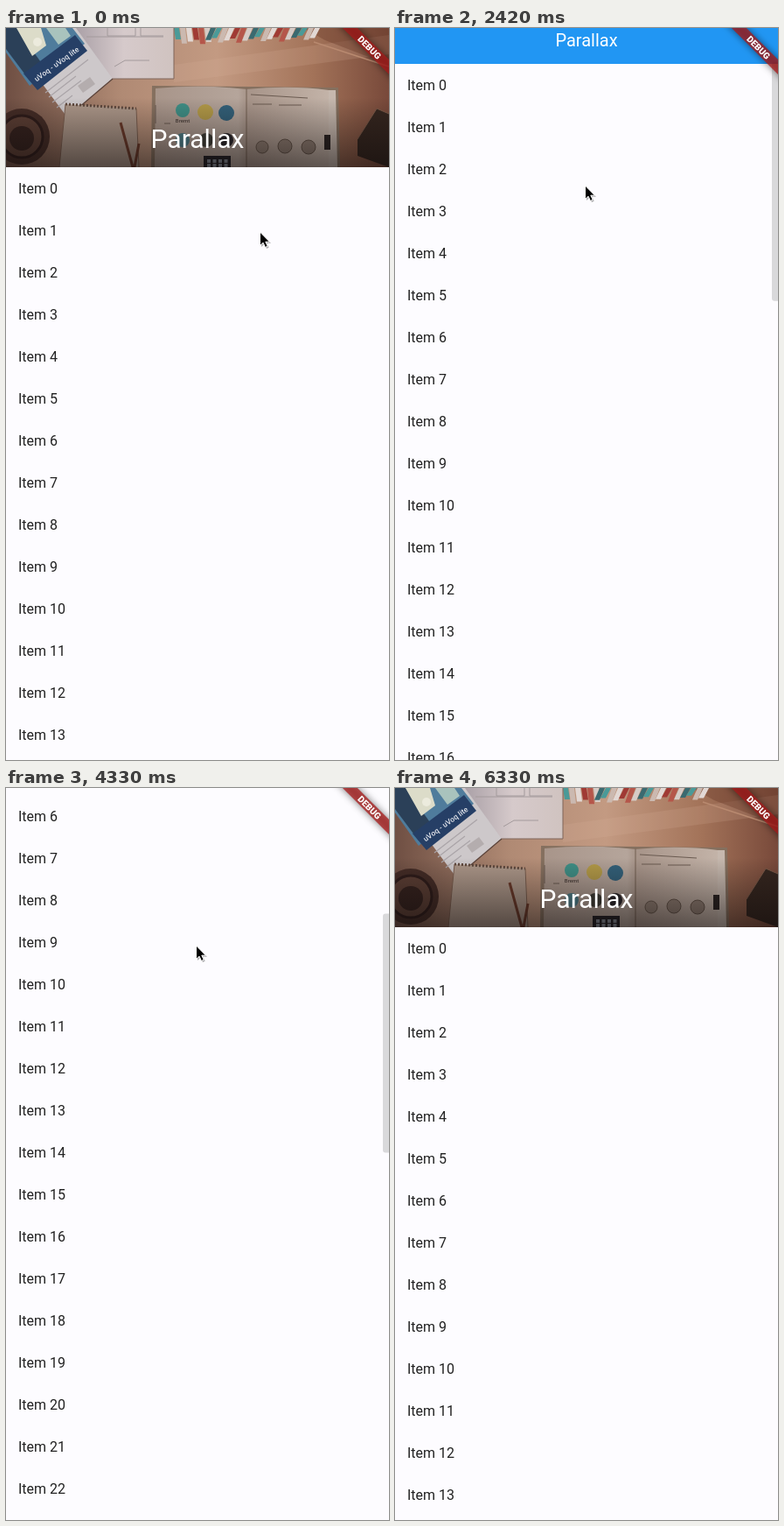
These frames come from a looping animation (438x836 px, 6.66 s). An HTML page:

```html
<!DOCTYPE html>
<html lang="en">
<head>
<meta charset="utf-8">
<title>Parallax list</title>
<style>
html, body { margin: 0; width: 100%; height: 100%; overflow: hidden; background: #fdfcff; }
svg { display: block; width: 100vw; height: 100vh; font-family: Roboto, sans-serif; }
</style>
</head>
<body>
<svg id="stage" viewBox="0 0 438 836" xmlns="http://www.w3.org/2000/svg">
  <defs>
    <linearGradient id="wood">
      <stop offset="0" stop-color="#6f4f43"/>
      <stop offset=".3" stop-color="#b08a74"/>
      <stop offset=".55" stop-color="#c39a82"/>
      <stop offset=".8" stop-color="#a37359"/>
      <stop offset="1" stop-color="#78493a"/>
    </linearGradient>
    <linearGradient id="scrim" x2="0" y2="1">
      <stop offset=".5" stop-color="#0c0808" stop-opacity="0"/>
      <stop offset="1" stop-color="#0c0808" stop-opacity=".55"/>
    </linearGradient>
    <linearGradient id="sheet">
      <stop offset="0" stop-color="#a99fa6"/>
      <stop offset=".5" stop-color="#d6cacb"/>
      <stop offset="1" stop-color="#d0c3c0"/>
    </linearGradient>
    <linearGradient id="page">
      <stop offset="0" stop-color="#a8958a"/>
      <stop offset=".48" stop-color="#b5a59b"/>
      <stop offset=".53" stop-color="#a79489"/>
      <stop offset="1" stop-color="#c3b3a8"/>
    </linearGradient>
    <filter id="soft" x="-30%" y="-120%" width="160%" height="340%"><feGaussianBlur stdDeviation="4"/></filter>
    <clipPath id="headClip"><rect id="headBox" width="438" height="159"/></clipPath>
  </defs>
  <rect width="438" height="836" fill="#fdfcff"/>
  <g id="list" font-size="16" fill="#212121"></g>

  <g clip-path="url(#headClip)">
    <rect width="438" height="159" fill="#2196f3"/>
    <g id="photo">
      <rect width="438" height="159" fill="url(#wood)"/>
      <path d="M192 42L438 8V30L192 62Z" fill="#d8b29c" opacity=".18"/>
      <path d="M340 0H438V42L365 14Z" fill="#6a3a2a" opacity=".4"/>
      <path d="M352 16L438 44" stroke="#b98a70" stroke-width="1.5"/>
      <g id="books"></g>

      <path d="M78 0H192V58H118Z" fill="url(#sheet)"/>
      <path d="M192 0V58H118" fill="none" stroke="#7f6558" stroke-width="1"/>
      <path d="M92 10H180M116 0V9H148V0M154 0V9H180M124 44L136 37H164" fill="none" stroke="#a39a9c"/>

      <path d="M0 0H80L122 58L70 102L0 8Z" fill="#cdc8ca"/>
      <path d="M0 0H76L90 18L27 66L0 28Z" fill="#4f7c9c"/>
      <path d="M0 0H12L42 42L27 60L0 24Z" fill="#2b4058"/>
      <path d="M12 0H40L46 20L30 32Z" fill="#dcdcc9"/>
      <path d="M46 0H68L74 9L60 19Z" fill="#a9c3bd"/>
      <circle cx="36" cy="16" r="5" fill="#ecebdd"/>
      <path d="M20 52L79 8L93 26L36 71Z" fill="#263f66"/>
      <text transform="translate(35 61.5) rotate(-36)" font-size="8.6" font-weight="500" fill="#e4e6ec">uVoq - uVoq lite</text>
      <path d="M45 74L94 36M49 79L80 55M53 85L86 60M58 91L76 77" stroke="#aaa4a8" stroke-width="1.2"/>
      <path d="M82 66L96 56L102 64L88 74Z" fill="#b4adae"/>
      <path d="M70 102L122 58" stroke="#5a4239" stroke-width="1.2"/>

      <circle cx="18" cy="124" r="32" fill="#442c26"/>
      <circle cx="18" cy="124" r="24" fill="#5b3e34" stroke="#2e1c1a" stroke-width="3"/>
      <circle cx="18" cy="126" r="14" fill="#35221e"/>
      <path d="M68 87L149 92L152 159H61Z" fill="#ac9789"/>
      <path d="M68 87L149 92" stroke="#5e483d" stroke-width="3" stroke-dasharray="2 2"/>
      <path d="M68 87L61 159M149 92L152 159" stroke="#7a5d4e" stroke-width="1"/>
      <path d="M131 108L145 159M152 132L147 159" stroke="#6b3a2a" stroke-width="3"/>

      <path d="M167 66L380 68L382 159H166Z" fill="#85705f"/>
      <path d="M171 69Q225 64 275 70Q325 65 369 71V159H170Z" fill="url(#page)"/>
      <path d="M369 71H377L379 159H369Z" fill="#c6b8ae"/>
      <path d="M275 69V159" stroke="#7c695c" stroke-width="1.2"/>
      <path d="M280 76L345 80M282 87H304M312 88H338M171 88V109M181 109H188" stroke="#6a5a50" stroke-width="1"/>
      <circle cx="202" cy="94" r="8" fill="#3f8f86"/>
      <circle cx="228" cy="96" r="9" fill="#b39a48"/>
      <circle cx="252" cy="97" r="9" fill="#33617a"/>
      <text x="202" y="108" font-size="6" font-weight="500" text-anchor="middle" fill="#4a3f3a">Bremt</text>
      <circle cx="202" cy="128" r="8" fill="#4d7f8a"/>
      <circle cx="229" cy="128" r="8" fill="#3b3a33"/>
      <circle cx="252" cy="128" r="8" fill="#29262a"/>
      <g fill="#8f7d72" stroke="#645449">
        <circle cx="293" cy="136" r="7"/>
        <circle cx="319" cy="135" r="8"/>
        <circle cx="346" cy="136" r="8"/>
      </g>
      <path d="M364 122H371V139H364Z" fill="#2a2322"/>
      <path d="M226 146H257V159H226Z" fill="#232126"/>
      <path d="M230 152H254M230 157H254" stroke="#868d98" stroke-width="4" stroke-dasharray="4 2.5"/>
      <path d="M402 127L424 92L438 98V159L402 146Z" fill="#35261f"/>
      <path d="M402 127L424 92L438 98" fill="none" stroke="#7b5a48" stroke-width="1"/>
      <rect width="438" height="159" fill="url(#scrim)"/>
    </g>
    <text id="title" font-size="20" text-anchor="middle" fill="#fff">Parallax</text>
  </g>

  <rect id="thumb" x="431" width="10" height="273.1" rx="3" fill="#000" fill-opacity=".14"/>

  <g transform="translate(438 0) rotate(45)">
    <rect x="-50" y="25.5" width="100" height="12" fill-opacity=".5" filter="url(#soft)"/>
    <rect x="-50" y="25.5" width="100" height="12" fill="#a81a1a" fill-opacity=".75"/>
    <text y="35.2" font-size="10.2" font-weight="900" text-anchor="middle" fill="#fff">DEBUG</text>
  </g>

  <g id="cursor">
    <path d="M0 0V15.5L3.6 12.2L6 17.5L8.7 16.2L6.3 11.2H11Z" opacity=".3" transform="translate(1.5 1.5)"/>
    <path d="M0 0V15.5L3.6 12.2L6 17.5L8.7 16.2L6.3 11.2H11Z" stroke="#fff"/>
  </g>
</svg>
<script>
const WIDTH = 438, VIEW = 836, HEAD = 159, BAR = 56, ROW = 48, ROWS = 50;
const LOOP = 6660, TICK = 1000 / 12;
const RANGE = HEAD - BAR;
const CONTENT = HEAD + ROW * ROWS;

// time in ms, scroll offset in px
const SCROLL = [[1080, 0], [1330, 25], [2000, 77], [2920, 185],
                [4040, 478], [4330, 440], [5000, 180], [5333, 0]];

const $ = id => document.getElementById(id);
const clamp = (v, lo = 0, hi = 1) => Math.min(hi, Math.max(lo, v));
const mix = (a, b, k) => a + (b - a) * k;

function add(parent, tag, attrs, text) {
  const el = document.createElementNS('http://www.w3.org/2000/svg', tag);
  for (const name in attrs) el.setAttribute(name, attrs[name]);
  if (text) el.textContent = text;
  parent.append(el);
}

function set(id, attrs) {
  for (const name in attrs) $(id).setAttribute(name, attrs[name]);
}

for (let i = 0; i < ROWS; i++) {
  add($('list'), 'text', { x: 14, y: HEAD + 30 + i * ROW }, 'Item ' + i);
}

const SPINES = ['#4a9a98', '#d6cbc6', '#a03a34', '#cbb9b0', '#3a6a70', '#b5564a', '#e2d8d4'];
for (let i = 0; i < 24; i++) {
  const x = 192 + i * 7, lean = i < 6 ? 2 : -6, end = 13 + (i * 5) % 7 - i * .2;
  add($('books'), 'path', {
    d: `M${x} 0h6l${lean} ${end}h-6Z`,
    fill: SPINES[(i * 3) % SPINES.length]
  });
}

// Slope at a knot: harmonic mean of its neighbours, zero at a turn
const secant = i => (SCROLL[i + 1][1] - SCROLL[i][1]) / (SCROLL[i + 1][0] - SCROLL[i][0]);
function slope(i) {
  if (i === 0 || i === SCROLL.length - 1) return secant(Math.max(0, i - 1));
  const a = secant(i - 1), b = secant(i);
  return a * b > 0 ? 2 * a * b / (a + b) : 0;
}

function scrollAt(t) {
  const last = SCROLL.length - 1;
  if (t <= SCROLL[0][0] || t >= SCROLL[last][0]) return 0;
  const i = SCROLL.findIndex(p => p[0] > t) - 1;
  const [t0, y0] = SCROLL[i], [t1, y1] = SCROLL[i + 1];
  const d = t1 - t0, k = (t - t0) / d, q = 1 - k;
  return q * q * ((1 + 2 * k) * y0 + k * d * slope(i)) +
         k * k * ((3 - 2 * k) * y1 - q * d * slope(i + 1));
}

function draw(time) {
  const step = Math.floor((time % LOOP + 5) / TICK);
  const t = step * TICK;
  const s = Math.round(scrollAt(t));
  const head = Math.max(0, HEAD - s);
  const fold = clamp(s / RANGE);
  const size = mix(1.5, 1, fold);

  set('list', { transform: `translate(0 ${-s})` });
  set('headBox', { height: head });
  set('photo', {
    transform: `translate(0 ${-fold * RANGE / 4 - Math.max(0, s - RANGE)})`,
    opacity: 1 - clamp((fold - 1 + BAR / RANGE) / (BAR / RANGE))
  });
  set('title', {
    transform: `translate(${WIDTH / 2} ${HEAD - s - 14.7 - 4.9 * size}) scale(${size})`
  });
  set('thumb', {
    y: s * VIEW / CONTENT,
    opacity: Math.min(clamp((t - 1080) / 250), 1 - clamp((t - 5860) / 300))
  });

  const move = clamp((step - 5) / 3);
  set('cursor', {
    transform: `translate(${mix(290.5, 217.5, move)} ${mix(233, 180, move)})`,
    visibility: step < 76 ? 'visible' : 'hidden'
  });
}

const start = performance.now();
function loop() {
  draw(performance.now() - start);
  requestAnimationFrame(loop);
}
loop();
</script>
</body>
</html>
```
